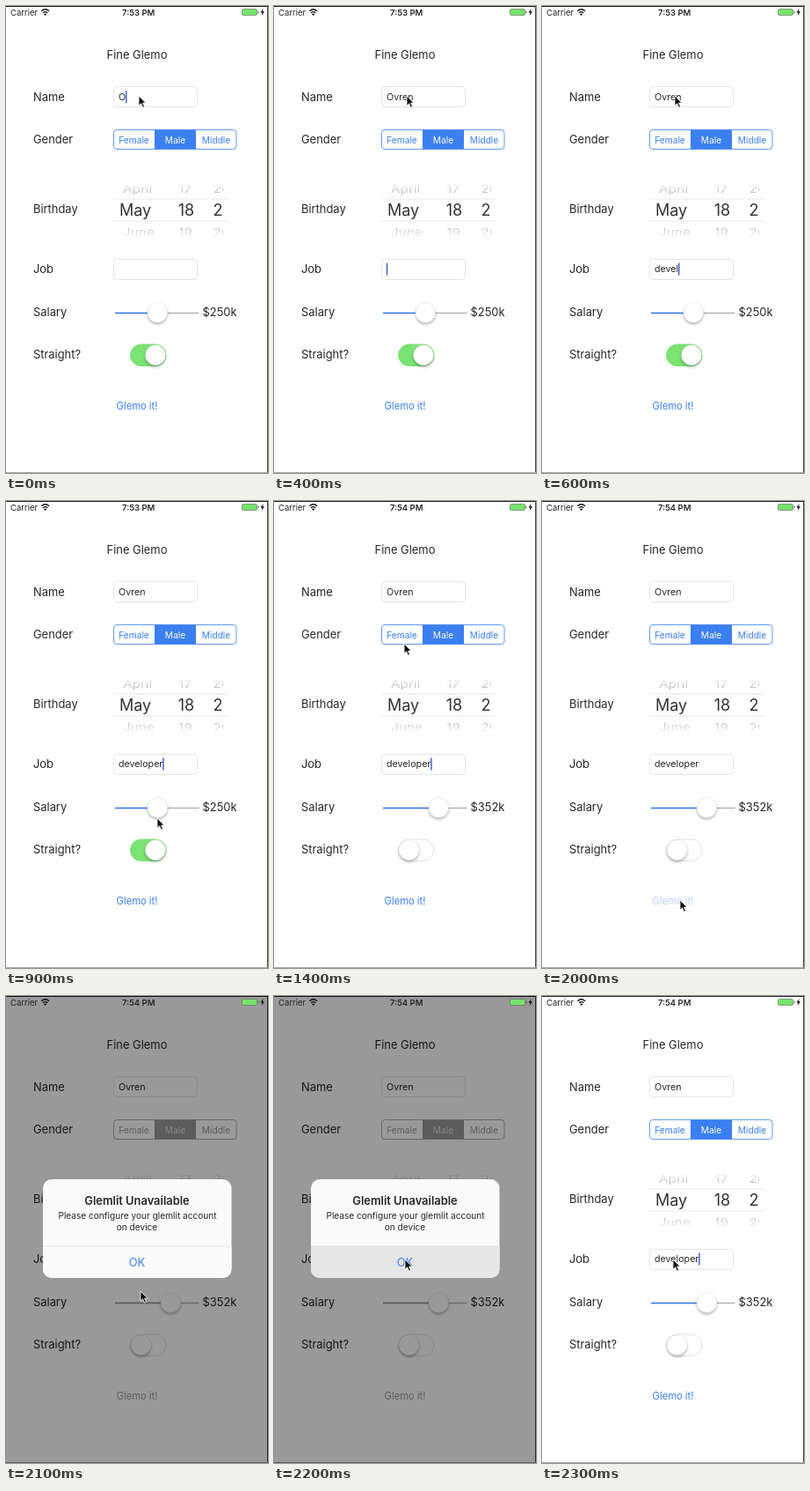
These frames come from a looping animation (298 px wide and 530 px high, 2.4 s). An HTML page:

```html
<!DOCTYPE html>
<html lang="en">
<head>
<meta charset="utf-8">
<title>Form demo</title>
<style>
  html, body { margin: 0; width: 100%; height: 100%; overflow: hidden; background: #fff; }
  svg { display: block; width: 298px; height: 530px; --tint: #3b7ff0; --on-tint: #fff; }
  svg.dim { --tint: #999; --on-tint: #ddd; }
  text { font-family: Inter, Roboto, sans-serif; font-size: 12.9px; fill: #262626; }
  .mid { text-anchor: middle; }
  .tint { fill: var(--tint); }
  .on-tint { fill: var(--on-tint); }
  .line { fill: none; stroke: var(--tint); stroke-width: .8; }
  .field { fill: #fff; stroke: #e4e4e4; }
  .field-text { font-size: 10.7px; }
  .seg { font-size: 10.2px; }
  .wheel text { font-size: 18px; fill: #333; }
  .wheel .far { font-size: 15.3px; fill: #aaa; }
  .track { stroke-width: 1.4; }
  .knob { fill: #fff; stroke: #dedede; stroke-width: .5; filter: drop-shadow(0 2px 1.7px rgba(0, 0, 0, .28)); }
  .status { font-size: 9.5px; }
  .bold { font-weight: 600; }
  .small { font-size: 10.1px; }
</style>
</head>
<body>
<svg id="stage" viewBox="0 0 298 530">
  <defs>
    <clipPath id="wheelClip"><path d="M122 202H247V261.5H122Z"/></clipPath>
    <clipPath id="alertClip"><rect x="42" y="208" width="214.5" height="112" rx="10"/></clipPath>
    <linearGradient id="fade" x2="0" y2="1">
      <stop offset="0" stop-color="#fff" stop-opacity=".9"/>
      <stop offset=".25" stop-color="#fff" stop-opacity="0"/>
      <stop offset=".75" stop-color="#fff" stop-opacity="0"/>
      <stop offset="1" stop-color="#fff" stop-opacity=".9"/>
    </linearGradient>
  </defs>
  <rect width="298" height="530" fill="#fff"/>

  <text class="mid" x="149" y="59.5">Fine Glemo</text>
  <g id="labels"></g>

  <rect class="field" x="122.5" y="91.5" width="95" height="23" rx="4"/>
  <rect class="field" x="122.5" y="287.5" width="95" height="23" rx="4"/>
  <text class="field-text" id="name" x="128" y="107"></text>
  <text class="field-text" id="job" x="128" y="302"></text>
  <rect id="caret" width="1.5" height="14" fill="#4763d6"/>

  <rect id="picked" class="tint" y="140.5" width="47" height="22"/>
  <rect class="line" x="122.5" y="140.5" width="139.5" height="22" rx="3.5"/>
  <path class="line" d="M169.5 140.5V162.5M215.5 140.5V162.5"/>
  <g id="segments">
    <text class="seg mid" x="145.5" y="155.5">Female</text>
    <text class="seg mid" x="192.5" y="155.5">Male</text>
    <text class="seg mid" x="239" y="155.5">Middle</text>
  </g>

  <g class="wheel" clip-path="url(#wheelClip)">
    <g id="wheel"></g>
    <rect x="122" y="201" width="126" height="61" fill="url(#fade)"/>
  </g>
  <path d="M122 219H253M122 244H253" stroke="#e4e4e4" stroke-width=".8"/>

  <path class="track" d="M124 348.5H219.5" stroke="#b3b3b3"/>
  <path class="track" id="track" stroke="var(--tint)"/>
  <circle id="slider" class="knob" cy="348" r="11.3"/>
  <text id="salary" x="223.5" y="352"></text>

  <rect id="switch" x="141.5" y="384" width="40.5" height="24.5" rx="12.25"/>
  <circle id="toggle" class="knob" cy="396.2" r="11.4"/>

  <text id="send" class="mid tint" x="149" y="458" style="font-size:11.2px">Glemo it!</text>

  <path d="M0 .5H298" stroke="#222"/>
  <path d="M297.5 0V530" stroke="#444"/>
  <path d="M0 529.5H298" stroke="#a5a5a5"/>

  <rect id="shade" width="298" height="530" opacity=".4"/>

  <text class="status" x="5" y="10.5">Carrier</text>
  <path d="M40.3 5.7Q44.7 1.9 49.1 5.7M42 7.8Q44.7 5.4 47.4 7.8" fill="none" stroke="#111" stroke-width="1.3"/>
  <path d="M43 9.3Q44.7 7.9 46.4 9.3L44.7 11Z" fill="#111"/>
  <text id="clock" class="status mid bold" x="150.7" y="10.5"></text>
  <rect x="268.5" y="3.5" width="17" height="7" rx="1.5" fill="#76e36a" stroke="#666" stroke-width=".6"/>
  <path d="M287 5.7V8.3" stroke="#555"/>
  <path d="M292.6 3L289.4 7.6H291.4L290.7 11L294 6.3H292Z" fill="#111"/>

  <g id="alert" clip-path="url(#alertClip)">
    <rect x="42" y="208" width="215" height="112" fill="#fafafa"/>
    <rect id="ok" x="42" y="284" width="215" height="36"/>
    <path d="M42 284H257" stroke="#dcdcdc" stroke-width=".7"/>
    <text class="mid bold" x="149" y="237">Glemlit Unavailable</text>
    <text class="mid small" x="149.5" y="253">Please configure your glemlit account</text>
    <text class="mid small" x="149" y="266">on device</text>
    <text class="mid" x="149" y="307" style="fill:#3b7ff0">OK</text>
  </g>

  <path id="pointer" d="M0 0V11.2L2.6 8.8L4.5 13.2L6.5 12.3L4.6 8.1H8Z" fill="#111" stroke="#fff" stroke-width=".8"/>
</svg>
<script>
  const LOOP = 2400, TICK = 100;
  const NAME = "Ovren", JOB = "developer";
  const $ = id => document.getElementById(id);
  const set = (id, attrs) => {
    for (const key in attrs) $(id).setAttribute(key, attrs[key]);
  };
  const show = (id, on) => set(id, { visibility: on ? "visible" : "hidden" });

  // Pointer stops: time, x, y. Each is held until the next.
  const stops = [
    [0, 151, 102], [700, 154, 150], [800, 165, 290], [900, 172, 360],
    [1000, 187, 358], [1100, 163, 403], [1200, 160, 394], [1300, 152, 240],
    [1400, 148, 162], [1500, 147, 153], [1600, 192, 154], [1700, 197, 232],
    [1800, 186, 330], [1900, 157, 453], [2100, 153, 335], [2200, 149, 299]
  ];

  const labels = { Name: 107.5, Gender: 155.5, Birthday: 235, Job: 303, Salary: 352, "Straight?": 400 };
  $("labels").innerHTML = Object.entries(labels)
    .map(([label, y]) => `<text x="31" y="${y}">${label}</text>`).join("");

  const far = (text, x, y) =>
    `<text class="far" transform="translate(${x} ${y}) scale(1 .75)">${text}</text>`;
  const column = (x, dx, [above, now, below]) =>
    far(above, x + dx, 211.5) + `<text x="${x}" y="237.5">${now}</text>` + far(below, x + dx, 260.5);
  $("wheel").innerHTML =
    column(129, 4, ["April", "May", "June"]) +
    column(195.7, .5, ["17", "18", "19"]) +
    column(235.5, 0, ["2015", "2016", "2017"]);

  function typeText(t) {
    const nameLen = Math.min(NAME.length, 1 + Math.round(t / 70));
    const jobLen = Math.max(0, Math.min(JOB.length, Math.round((t - 400) / 44)));
    $("name").textContent = NAME.slice(0, nameLen);
    $("job").textContent = JOB.slice(0, jobLen);
    const inName = t < 400;
    const field = $(inName ? "name" : "job");
    const width = field.textContent ? field.getComputedTextLength() : 0;
    set("caret", { x: 128 + width - .2, y: inName ? 96 : 291.5 });
    show("caret", t < 1900 || t >= 2300);
  }

  function draw(t) {
    typeText(t);

    const seg = t === 1500 ? 0 : 1;
    set("picked", { x: 122.5 + 46.5 * seg, rx: seg ? 0 : 3.5 });
    [...$("segments").children].forEach((label, i) => {
      label.classList.toggle("on-tint", i === seg);
      label.classList.toggle("tint", i !== seg);
    });

    const raised = t >= 1000;
    const knobX = raised ? 187.3 : 172.3;
    set("slider", { cx: knobX });
    set("track", { d: `M124 348.5H${knobX}` });
    $("salary").textContent = raised ? "$352k" : "$250k";

    const straight = t < 1200;
    set("switch", { fill: straight ? "#7be274" : "#fff", stroke: straight ? "#7be274" : "#e0e0e0" });
    set("toggle", { cx: straight ? 170 : 153.5 });

    $("clock").textContent = t < 1300 ? "7:53 PM" : "7:54 PM";
    set("send", { opacity: t === 2000 ? .35 : 1 });

    const alerting = t >= 2100 && t < 2300;
    $("stage").classList.toggle("dim", alerting);
    show("shade", alerting);
    show("alert", alerting);
    set("ok", { fill: t === 2200 ? "#e6e6e6" : "#fafafa" });

    const [, x, y] = stops.filter(stop => stop[0] <= t).pop();
    set("pointer", { transform: `translate(${x} ${y})` });
  }

  function loop() {
    draw(Math.floor(performance.now() % LOOP / TICK) * TICK);
    requestAnimationFrame(loop);
  }
  loop();
</script>
</body>
</html>
```
